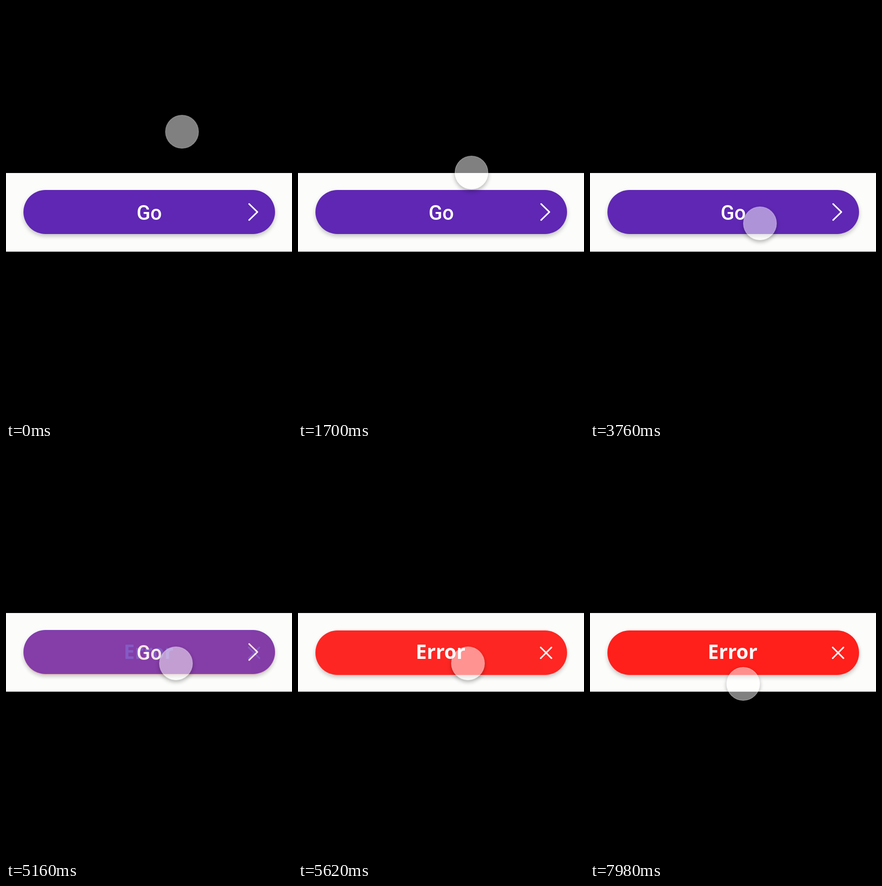
Write an HTML page that moves like this. It is 624 by 898 pixels and loops after 8 s.

```html
<!DOCTYPE html>
<html lang="en">
<head>
<meta charset="utf-8">
<title>Go button</title>
<style>
  html, body { margin: 0; width: 100%; height: 100%; overflow: hidden; background: #000; }
  .stage { position: relative; width: 624px; height: 898px; overflow: hidden; }
  .band {
    position: absolute; top: 364px; width: 100%; height: 171px;
    background: #fcfcfb; border-bottom: 1px solid #777;
  }
  .button {
    position: absolute; left: 38px; width: 549px; height: 96px; border-radius: 48px;
    box-shadow: 0 5px 10px rgba(0, 0, 0, .22);
    color: #fff; line-height: 96px; text-align: center;
  }
  .go { top: 401px; background: #5f27b3; font: 500 44px/96px Roboto, sans-serif; animation: fade-out 8s infinite; }
  .error { top: 402px; height: 97px; background: #ff1f1b; font: 600 43px/96px "Noto Sans", sans-serif; animation: fade-in 8s infinite; }
  .button span { position: relative; }
  .go span { top: 2px; }
  .error span { top: -2px; left: -1.5px; }
  svg {
    position: absolute; inset: 0; width: 100%; height: 100%; overflow: visible;
    fill: none; stroke: #fff; stroke-width: 3.3; stroke-linecap: round; stroke-linejoin: round;
  }
  .touch {
    position: absolute; left: -36.5px; top: -36.5px; width: 73px; height: 73px;
    box-sizing: border-box; border: 1.5px solid rgba(255, 255, 255, .35); border-radius: 50%;
    background: rgba(255, 255, 255, .5);
    box-shadow: 0 4px 10px rgba(0, 0, 0, .3);
    animation: drift 8s linear infinite;
  }
  /* 62.5% = 5.0 s, 71.25% = 5.7 s */
  @keyframes fade-out {
    0%, 62.5% { opacity: 1; animation-timing-function: cubic-bezier(.36, 0, .64, 1); }
    71.25%, 100% { opacity: 0; }
  }
  @keyframes fade-in {
    0%, 62.5% { opacity: 0; animation-timing-function: cubic-bezier(.36, 0, .64, 1); }
    71.25%, 100% { opacity: 1; }
  }
  @keyframes drift {
    0% { transform: translate(383.5px, 273.5px); }
    10.25% { transform: translate(381px, 282px); }
    13.75% { transform: translate(378.5px, 316.8px); }
    20.5% { transform: translate(378px, 358px); }
    31% { transform: translate(377.5px, 420px); }
    33% { transform: translate(377px, 437px); }
    41.5% { transform: translate(376px, 463px); }
    46.5%, 73% { transform: translate(370.3px, 473.3px); }
    82.5% { transform: translate(355px, 488px); }
    85.5% { transform: translate(350.3px, 495px); }
    93% { transform: translate(338px, 512px); }
    99.75%, 100% { transform: translate(333.7px, 518px); }
  }
</style>
</head>
<body>
<div class="stage">
  <div class="band"></div>
  <div class="button go">
    <span>Go</span>
    <svg><path d="M492.5 30.5 L510.5 48 L492.5 65.5"/></svg>
  </div>
  <div class="button error">
    <span>Error</span>
    <svg><path d="M491.5 37 L515 60.5 M515 37 L491.5 60.5"/></svg>
  </div>
  <div class="touch"></div>
</div>
</body>
</html>
```
